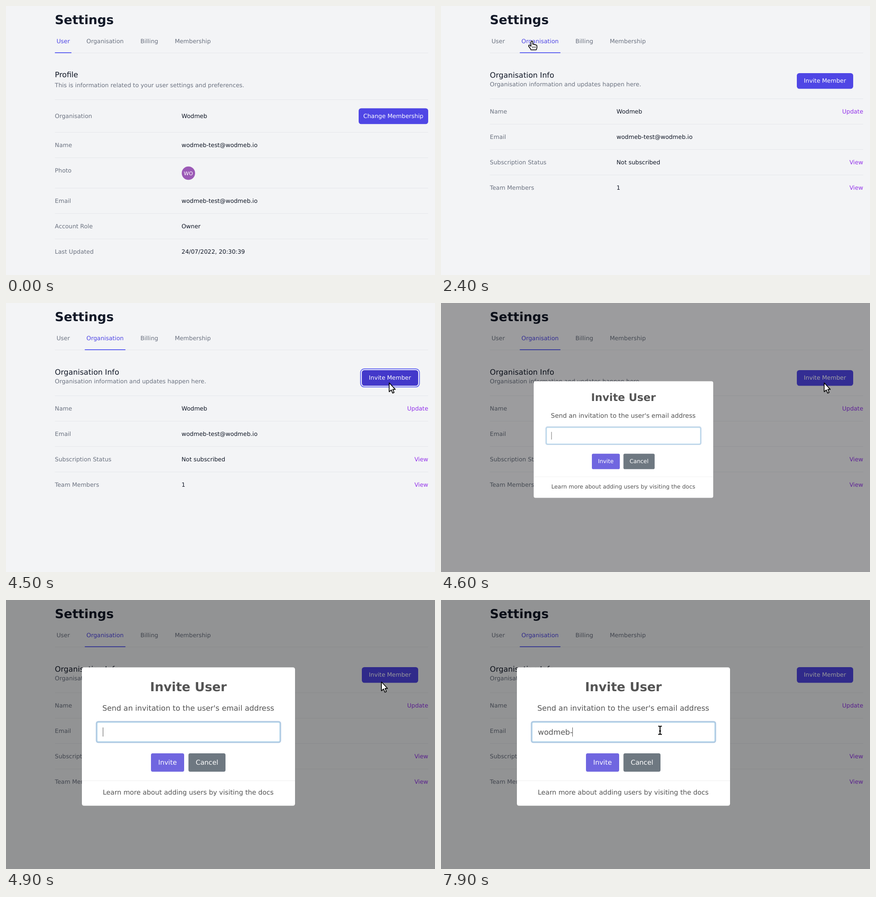
Write an HTML page with a canvas that moves like this. It is 944 px wide and 593 px high and loops after 8000 ms.

```html
<!DOCTYPE html>
<html lang="en">
<head>
<meta charset="utf-8">
<title>Settings</title>
<style>
html, body { margin: 0; width: 100%; height: 100%; overflow: hidden; background: #f3f4f6; }
canvas { display: block; }
</style>
</head>
<body>
<canvas id="stage" width="944" height="593"></canvas>
<script>
const ctx = document.getElementById('stage').getContext('2d');
const LOOP = 8000, STEP = 100;
const UNIT = 32 / 35; // page zoom
const LEFT = 107.6, RIGHT = 929, VALUE_X = 386.3;
const BODY = 14 * UNIT, LARGE = 18 * UNIT, TITLE = 30 * UNIT, NORMAL = 16 * UNIT;
const DARK = '#111827', GRAY = '#6b7280', LINE = '#e5e7eb', INDIGO = '#4f46e5',
      RING = '#6366f1', HOVER = '#4338ca', PURPLE = '#9333ea', MODAL = '#545454';
const ORG = 'Wodmeb', EMAIL = 'wodmeb-test@wodmeb.io', TYPED = 'wodmeb-';
const KEY_TIMES = [6400, 6600, 6700, 6900, 7100, 7300, 7900];
const TABS = [['User', 107.6, 144], ['Organisation', 173.4, 262.8], ['Billing', 292], ['Membership', 367.8]];

const clamp = v => Math.max(0, Math.min(1, v));
const mix = (a, b, p) => a + (b - a) * p;
const smooth = p => p * p * (3 - 2 * p);
const easeOut = p => 1 - (1 - p) * (1 - p);
const span = (t, from, to) => clamp((t - from) / (to - from));

function text(str, x, y, size, color, align = 'left', weight = 'normal') {
  ctx.font = `${weight} ${size}px "DejaVu Sans", sans-serif`;
  ctx.textAlign = align;
  ctx.fillStyle = color;
  ctx.fillText(str, x, y);
}

function rect(x, y, w, h, color) {
  ctx.fillStyle = color;
  ctx.fillRect(x, y, w, h);
}

function round(x, y, w, h, r, color) {
  ctx.beginPath();
  ctx.roundRect(x, y, w, h, r);
  ctx.fillStyle = color;
  ctx.fill();
}

function row(top, baseline, label, value) {
  rect(LEFT, top, RIGHT - LEFT, 1, LINE);
  text(label, LEFT, baseline, BODY, GRAY);
  if (value) text(value, VALUE_X, baseline, BODY, DARK);
}

function header(active, hovered) {
  text('Settings', LEFT, 40, TITLE, DARK, 'left', 'bold');
  rect(LEFT, 103, RIGHT - LEFT, 1, LINE);
  TABS.forEach(([name, x, end], i) => {
    const color = i === active ? INDIGO : i === hovered ? '#374151' : GRAY;
    text(name, x + 4 * UNIT, 82, BODY, color);
    if (i === active || i === hovered) rect(x, 102, end - x, 2, i === active ? RING : '#d1d5db');
  });
}

function userPage() {
  text('Profile', LEFT, 157, LARGE, DARK);
  text('This is information related to your user settings and preferences.', LEFT, 179, BODY, GRAY);
  row(206, 247, 'Organisation', ORG);
  row(278, 311, 'Name', EMAIL);
  row(334, 367, 'Photo');
  row(401, 434, 'Email', EMAIL);
  row(457, 490, 'Account Role', 'Owner');
  row(513, 546, 'Last Updated', '24/07/2022, 20:30:39');
  round(776, 225.5, 153, 34.8, 5.5, INDIGO);
  text('Change Membership', 852.4, 247, BODY, '#fff', 'center');
  round(386.7, 353.8, 29.4, 29.4, 14.7, '#9b59b6');
  text('WO', 401.3, 372.5, 11.2, '#fff', 'center');
}

function orgPage(hovered, focused) {
  text('Organisation Info', LEFT, 158, LARGE, DARK);
  text('Organisation information and updates happen here.', LEFT, 177, BODY, GRAY);
  row(204, 237, 'Name', ORG);
  row(260, 293, 'Email', EMAIL);
  row(316, 349, 'Subscription Status', 'Not subscribed');
  row(372, 405, 'Team Members', '1');
  [['Update', 237], ['View', 349], ['View', 405]].forEach(([s, y]) => text(s, RIGHT, y, BODY, PURPLE, 'right'));
  if (focused) {
    round(779.3, 144.3, 131.4, 41.8, 9, RING);
    round(781.2, 146.2, 127.6, 38, 7.3, '#fff');
  }
  round(783, 148, 124, 34.5, 5.5, hovered ? HOVER : INDIGO);
  text('Invite Member', 844.9, 169, BODY, '#fff', 'center');
}

// Pop-in: grow past full size, dip, settle
function popScale(ms) {
  if (ms < 135) return mix(0.7, 1.05, easeOut(ms / 135));
  if (ms < 240) return mix(1.05, 0.95, easeOut((ms - 135) / 105));
  return mix(0.95, 1, easeOut(clamp((ms - 240) / 60)));
}

function modal(t) {
  const scale = popScale(t - 4569), mid = 401.4;
  rect(0, 0, 944, 593, `rgba(0,0,0,${t < 4700 ? 0.36 : 0.4})`);
  ctx.save();
  ctx.translate(mid, 301);
  ctx.scale(scale, scale);
  ctx.translate(-mid, -301);
  round(167, 148.5, 469, 305, 4.6, '#fff');
  text('Invite User', mid, 200.5, TITLE, MODAL, 'center', 'bold');
  text("Send an invitation to the user's email address", mid - 0.4, 244, LARGE, MODAL, 'center');

  const glow = t < 4700 ? 0.38 : 0.5;
  round(197.6, 266.7, 407.8, 48.6, 5.5, `rgba(100,150,200,${glow})`);
  round(200.3, 269.4, 402.4, 43.2, 3.1, '#b4dbed');
  round(201.3, 270.4, 400.4, 41.2, 2.2, '#fff');

  const typed = TYPED.slice(0, KEY_TIMES.filter(k => t >= k).length);
  text(typed, 213.2, 297, LARGE, MODAL);
  if (t < 5200 || t >= 5800) rect(Math.floor(213.2 + ctx.measureText(typed).width), 281, 1, 20, MODAL);

  round(319, 338, 73, 40.5, 3.7, '#7066e0');
  text('Invite', 355.4, 363, NORMAL, '#fff', 'center');
  round(401.5, 338, 81.5, 40.5, 3.7, '#6e7881');
  text('Cancel', 442.2, 363, NORMAL, '#fff', 'center');
  rect(167, 398, 469, 1, '#eee');
  text('Learn more about adding users by visiting the docs', mid - 0.5, 429, NORMAL, MODAL, 'center');
  ctx.restore();
}

const SHAPES = {
  arrow: new Path2D('M0 0V19.6L4.6 15.6L7.7 22.6L10.8 21.2L7.8 14.4H13.4Z'),
  hand: new Path2D('M-2 1.8Q0-1 2 1.8V7.6Q4 6.4 5.4 8.2Q7.4 7.2 8.6 9Q11 8.6 11 11.5V14.5Q10.8 16.5 9.6 19.5H-2.2Q-2.6 17.4-4.6 15L-7.2 11.6Q-7.6 8.8-4.8 9.4L-2 12Z'),
  folds: new Path2D('M1.4 12V16M4.4 12V16M7.4 12V16'),
  beam: new Path2D('M-4-9H-2Q0-9 0-7V7Q0 9-2 9H-4M4-9H2Q0-9 0-7M4 9H2Q0 9 0 7M-2 1.5H2')
};

function outline(path, color, width) {
  ctx.strokeStyle = color;
  ctx.lineWidth = width;
  ctx.stroke(path);
}

function drawCursor({ kind, x, y }) {
  ctx.save();
  ctx.translate(x, y);
  ctx.lineJoin = 'round';
  if (kind === 'beam') {
    outline(SHAPES.beam, '#fff', 4);
    outline(SHAPES.beam, '#000', 2);
  } else {
    ctx.save();
    ctx.shadowColor = 'rgba(0,0,0,.35)';
    ctx.shadowBlur = 2;
    ctx.shadowOffsetY = 1;
    ctx.fillStyle = '#fff';
    ctx.fill(SHAPES[kind]);
    ctx.restore();
    outline(SHAPES[kind], '#000', 1.6);
    if (kind === 'hand') outline(SHAPES.folds, '#000', 1);
  }
  ctx.restore();
}

function cursorAt(t) {
  if (t < 1200) return null;
  if (t < 3300) {
    const p = smooth(span(t, 1150, 2000));
    const y = mix(-10.5, 77, p);
    return { kind: y > 56 ? 'hand' : 'arrow', x: mix(101.5, 200, p), y };
  }
  if (t < 4500) {
    const p = smooth(span(t, 3200, 4000)), q = 1 - p;
    const x = mix(200, 843, p);
    const y = 77 * q * q + 460 * p * q + 176 * p * p;
    const onTab = x < 263 && y < 104, onButton = x > 783 && y < 182.5;
    return { kind: onTab || onButton ? 'hand' : 'arrow', x, y, onButton };
  }
  if (t < 5400) {
    const p = smooth(span(t, 4855, 5200));
    return { kind: 'arrow', x: mix(843.2, 478, p), y: mix(176, 273, p), onButton: t < 4600 };
  }
  return { kind: 'beam', x: 482, y: 287.2 };
}

function draw(t) {
  const cursor = cursorAt(t);
  const onOrg = t < 2400 && cursor && cursor.kind === 'hand';
  rect(0, 0, 944, 593, '#f3f4f6');
  header(t < 2400 ? 0 : 1, onOrg ? 1 : -1);
  if (t < 2400) userPage();
  else orgPage(cursor.onButton, t >= 4500 && t < 4600);
  if (t >= 4600) modal(t);
  if (cursor) drawCursor(cursor);
}

function tick() {
  const now = performance.now() % LOOP;
  draw(Math.floor(now / STEP) * STEP);
  requestAnimationFrame(tick);
}

ctx.textRendering = 'geometricPrecision';
tick();
</script>
</body>
</html>
```
